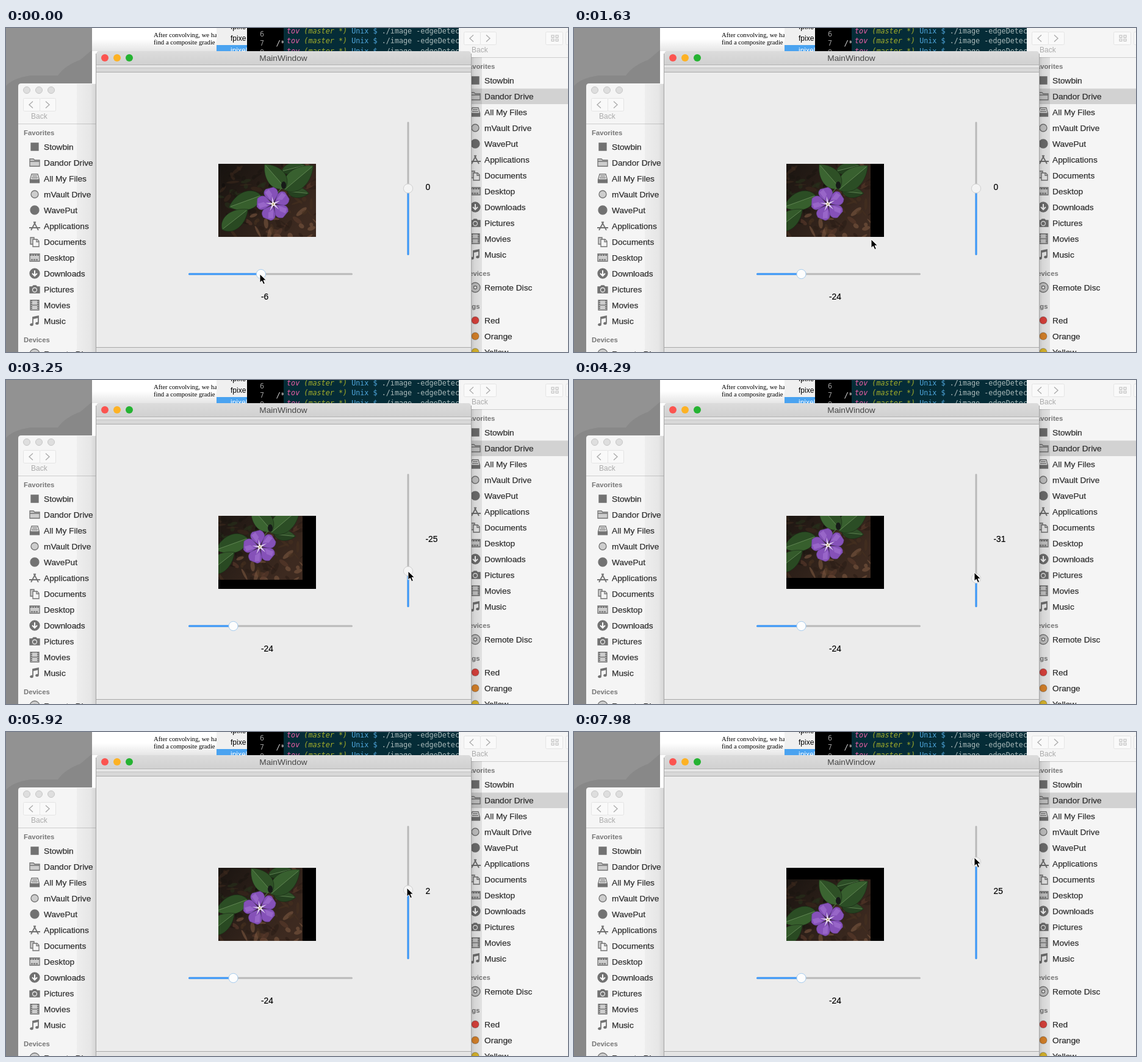
Animation, 921 px wide and 532 px high, one loop 8 s. Source, as an HTML page:

```html
<!DOCTYPE html>
<html lang="en">
<head>
<meta charset="utf-8">
<title>MainWindow</title>
<style>
  html, body { margin: 0; width: 100%; height: 100%; overflow: hidden; background: #8f8f8f; }
  svg { display: block; }
  text { font-family: "Liberation Sans", Arial, sans-serif; font-size: 13.7px; white-space: pre; }
  .row { fill: #303030; stroke: #303030; stroke-width: .25; }
  .head { font-size: 11.3px; font-weight: bold; fill: #777; }
  .back { font-size: 12px; fill: #ababab; }
  .icon { fill: none; stroke: #727272; stroke-width: 1.3; }
  .icon .solid { fill: #727272; }
  .icon .soft { fill: #cdcdcd; }
  .paper { font-family: "Liberation Serif", "Noto Serif", serif; font-size: 10.7px; }
  .list { font-size: 12px; }
  .mono { font-family: "DejaVu Sans Mono", monospace; font-size: 11.75px; }
  .value { font-size: 13.8px; stroke: #000; stroke-width: .2; }
</style>
</head>
<body>
<svg id="stage" width="921" height="532" viewBox="0 0 921 532">
  <defs>
    <linearGradient id="title" x2="0" y2="1"><stop stop-color="#dcdcdc"/><stop offset="1" stop-color="#d0d0d0"/></linearGradient>
    <linearGradient id="shade"><stop stop-opacity=".22"/><stop offset=".3" stop-opacity=".13"/><stop offset="1" stop-opacity=".08"/></linearGradient>
    <linearGradient id="shadeLeft"><stop stop-opacity=".03"/><stop offset=".7" stop-opacity=".06"/><stop offset="1" stop-opacity=".14"/></linearGradient>
    <linearGradient id="shadeTop" x2="0" y2="1"><stop stop-opacity="0"/><stop offset="1" stop-opacity=".1"/></linearGradient>
    <linearGradient id="soil" y2=".6"><stop stop-color="#16120f"/><stop offset="1" stop-color="#3d2a20"/></linearGradient>
    <clipPath id="photoEdge"><rect width="160" height="120"/></clipPath>
  </defs>

  <rect width="921" height="532" fill="#929292"/>
  <path d="M0 95Q12 82 40 78H85Q96 62 122 52L141 36V92H20V532H0z" fill="#888"/>

  <rect x="141" width="204" height="92" fill="#fff"/>
  <text class="paper" x="242" y="15">After convolving, we ha</text>
  <text class="paper" x="242" y="27">find a composite gradie</text>
  <rect x="141" y="18" width="204" height="20" fill="url(#shadeTop)"/>

  <rect x="345" width="50" height="40" fill="#f0f0f0"/>
  <rect x="345" y="28" width="50" height="12" fill="#4aa3f0"/>
  <text class="list" x="368" y="2">fpixe</text>
  <text class="list" x="368" y="21">fpixe</text>
  <text class="list" x="368" y="41" fill="#fff">ipixel</text>
  <rect x="395" width="60" height="40"/>
  <g fill="#9a9a9a"><text class="mono" x="416" y="14">6</text><text class="mono" x="416" y="29">7</text><text class="mono" x="416" y="44">8</text><text class="mono" x="443" y="29" font-style="italic" fill="#ddd">/*</text></g>
  <rect x="455" width="287" height="40" fill="#052c37"/>
  <g id="terminal"></g>

  <g id="finders"></g>

  <rect x="116" y="92" width="32" height="440" fill="url(#shadeLeft)"/>
  <rect x="762" y="48" width="18" height="484" fill="url(#shade)"/>

  <path d="M148 532V43q0-5 5-5H757q5 0 5 5V532z" fill="#ececec"/>
  <path d="M148 61V43q0-5 5-5H757q5 0 5 5V61z" fill="url(#title)"/>
  <path d="M148 60.5H762" stroke="#b4b4b4"/>
  <rect x="148" y="61" width="614" height="4" fill="#e6e6e6"/>
  <rect x="148" y="65" width="614" height="7" fill="#d8d8d8"/>
  <path d="M148 65.5H762" stroke="#c2c2c2"/>
  <path d="M148 72.5H762M148 524.5H762" stroke="#a9a9a9"/>
  <rect x="148" y="525" width="614" height="7" fill="#e4e4e4"/>
  <path d="M147.5 42V532M762.5 42V532" stroke="#a5a5a5"/>
  <circle cx="162" cy="49" r="6" fill="#fb5450"/><circle cx="182" cy="49" r="6" fill="#fdb224"/><circle cx="202" cy="49" r="6" fill="#25b332"/>
  <text class="title" x="454.5" y="54" text-anchor="middle" fill="#454545">MainWindow</text>

  <svg x="348" y="223" width="160" height="120">
    <rect width="160" height="120"/>
    <g id="photo"><g id="scene" clip-path="url(#photoEdge)"></g></g>
  </svg>

  <g stroke-width="3" stroke-linecap="round">
    <path d="M300.5 404H566.5M659 155.5V371.5" stroke="#b9b9b9"/>
    <path id="fillX" stroke="#3b99fc"/><path id="fillY" stroke="#3b99fc"/>
  </g>
  <circle id="knobX" cy="404" r="7.6" fill="#fdfdfd" stroke="#a3cbee"/>
  <circle id="knobY" cx="659" r="7.6" fill="#f4f4f4" stroke="#cfcfcf"/>
  <text id="labelX" class="value" x="418" y="446"></text>
  <text id="labelY" class="value" x="687.5" y="266"></text>
  <path id="cursor" d="M0 0V14.2L3.3 11.2L5.8 16.7L8.4 15.6L6 10.2H10.5Z" stroke="#fff"/>
</svg>

<script>
const $ = id => document.getElementById(id);

// Sidebar windows
const sidebar = [
  ['Stowbin', '<path class="solid" d="M-6-6H6V6H-6z"/>'],
  ['Dandor Drive', '<path class="soft" d="M-8-6h6l2 2h8v10H-8zM-8-2H8"/>'],
  ['All My Files', '<path d="M-5-7H5L7.500 2V7H-7.500V2zM-7.500 2H7.500M-4-4H4M-5-1H5"/><path class="solid" d="M-7 3H7V6H-7z"/>'],
  ['mVault Drive', '<circle class="soft" r="6"/>'],
  ['WavePut', '<circle class="solid" r="7"/>'],
  ['Applications', '<path d="M-9 3H9M-6 7L1.500-7M6 7L-1.500-7" stroke-width="1.8"/>'],
  ['Documents', '<path class="soft" d="M-7-7h6v11h-6z"/><path fill="#f4f4f4" d="M-3-4H4L7-1V8H-3zM3-4V0H7"/>'],
  ['Desktop', '<path class="soft" d="M-8-6H8V6H-8z"/><path d="M-8-4H8M-6 3.500H6" stroke-width="2" stroke-dasharray="3 1"/>'],
  ['Downloads', '<circle class="solid" r="8"/><path d="M0-5V4M-4 0L0 4L4 0" stroke="#fff" stroke-width="2"/>'],
  ['Pictures', '<path class="solid" d="M-8-4h4l2-2h4l2 2h4V6H-8z"/><circle cy="1" r="3.500" stroke="#eee"/>'],
  ['Movies', '<path class="soft" d="M-7-8H7V8H-7z"/><path d="M-5.500-8V8M5.500-8V8" stroke-width="3" stroke-dasharray="2 1"/><path d="M-4 0H4"/>'],
  ['Music', '<path d="M-3 5V-6L6-8V3M-3-4L6-6" stroke-width="1.8"/><ellipse class="solid" cx="-5" cy="6" rx="2.200" ry="1.500"/><ellipse class="solid" cx="4" cy="4" rx="2.200" ry="1.500"/>']
];
const disc = '<circle class="soft" r="8"/><circle r="2.500" fill="#fff"/>';
const row = (y, name, icon) =>
  `<g class="icon" transform="translate(47 ${y})">${icon}</g><text class="row" x="62" y="${y + 5}">${name}</text>`;
const head = (y, name) => `<text class="head" x="29" y="${y + 4}">${name}</text>`;
const tag = (y, name, color) => row(y, name, `<circle r="6" fill="${color}" stroke="#0003"/>`);

function finder(dx, dy, selected) {
  const dots = [34, 54, 74].map(x => `<circle cx="${x}" cy="102" r="5.500" fill="#dedede" stroke="#c6c6c6"/>`).join('');
  const buttons = [[28, 27], [55, 26], [162, 28], [195, 28]]
    .map(([x, w]) => `<rect x="${x + .5}" y="115.500" width="${w}" height="21" rx="2" fill="#f9f9f9" stroke="#e4e4e4"/>`).join('');
  const grid = [[172, 121], [179, 121], [172, 127], [179, 127]]
    .map(([x, y]) => `<rect x="${x}" y="${y}" width="4" height="3.500" fill="none" stroke="#b9b9b9"/>`).join('');
  return `<g transform="translate(${dx} ${dy})">
    <path d="M20 700V96q0-5 5-5H320V700z" fill="#f5f5f5"/>
    <path d="M20 157.500H320" stroke="#cdcdcd"/>
    ${selected ? '<path d="M20 208.500H320V234H20z" fill="#d2d2d2"/>' : ''}
    ${dots}${buttons}${grid}
    <path d="M44 120.500L38 126L44 131.500M65 120.500L71 126L65 131.500" fill="none" stroke="#adadad" stroke-width="1.400"/>
    <text class="back" x="41" y="149">Back</text>
    ${head(172, 'Favorites')}${sidebar.map(([n, i], k) => row(195 + 26 * k, n, i)).join('')}
    ${head(512, 'Devices')}${row(535, 'Remote Disc', disc)}
    ${head(566, 'Tags')}${tag(589, 'Red', '#e8453f')}${tag(615, 'Orange', '#e58a2c')}${tag(641, 'Yellow', '#e9c22e')}
  </g>`;
}
$('finders').innerHTML = finder(0, 0, false) + finder(722, -109, true);

$('terminal').innerHTML = [9, 25, 42].map(y => `<text class="mono" x="460" y="${y}"><tspan fill="#ee5fa7" font-style="italic">tov</tspan><tspan fill="#a3ad2a" font-style="italic"> (master *)</tspan><tspan fill="#4fa6dc"> Unix $</tspan><tspan fill="#a9b9b9"> ./image -edgeDetec</tspan></text>`).join('');

// Flower picture
let seed = 11;
const rand = () => (seed = seed * 16807 % 2147483647) / 2147483647;
const blot = () => {
  const x = rand() * 160, y = rand() * 120;
  const warm = ['#5a3b2b', '#7a5740', '#46301f', '#2a1c15'], dark = ['#0f0d0b', '#26301a', '#3a281c', '#1a1511'];
  const color = (x + y > 140 ? warm : dark)[Math.floor(rand() * 4)];
  return `<ellipse transform="translate(${x} ${y}) rotate(${rand() * 180})" rx="${3 + rand() * 8}" ry="${1 + rand() * 3.5}" fill="${color}" opacity=".6"/>`;
};
const leaf = (x, y, len, w, angle, color) =>
  `<g transform="translate(${x} ${y}) rotate(${angle})"><path d="M0 0C${len * .15} ${-w} ${len * .65} ${-w} ${len} 0C${len * .65} ${w} ${len * .15} ${w} 0 0z" fill="${color}" stroke="#1b2c17" stroke-width=".6"/><path d="M0 0C${len * .15} ${w} ${len * .65} ${w} ${len} 0z" fill="#0c1f0c" opacity=".28"/><path d="M2 0H${len - 3}" stroke="#6f9460" stroke-width=".7"/></g>`;
const petal = angle =>
  `<g transform="rotate(${angle})"><path d="M2 0L13-10Q21-15 26-8L27 5Q22 13 14 10z" fill="#8551b8" stroke="#64409a" stroke-width=".5"/><path d="M8-4L21-10L25-3L16 1z" fill="#9f6fce" opacity=".7"/><path d="M1-1.500L13 0L1 1.500z" fill="#e6daf2"/></g>`;
$('scene').innerHTML = '<rect width="160" height="120" fill="url(#soil)"/>'
  + Array.from({ length: 130 }, blot).join('')
  + leaf(113, 45, 36, 12, 6, '#2f4f28') + leaf(104, 12, 40, 12, -14, '#2c4d26')
  + leaf(108, 43, 62, 22, -40, '#38602f') + leaf(110, 40, 52, 20, -131, '#3b6431')
  + leaf(70, 52, 56, 20, 160, '#375f2d') + leaf(6, 108, 54, 19, -38, '#345a2b')
  + '<path d="M92 58Q98 44 106 38" fill="none" stroke="#4c6a3b" stroke-width="1.500"/><ellipse cx="107" cy="35" rx="4" ry="6" fill="#171a18"/>'
  + `<g transform="translate(90 66)">${[-100, -28, 44, 116, 188].map(petal).join('')}<circle r="2.800" fill="#f0ead8"/><circle r="1" fill="#94803c"/></g>`;

const STEP = 147.85, LOOP = 8000;
const tracks = {
  x: [[2, -6], [6, -14], [7, -14], [10, -24]],
  y: [[13, 0], [15, -6], [23, -28], [26, -33], [29, -31], [31, -25], [34, -12], [35, -12], [43, 10], [44, 12], [51, 22], [54, 25]],
  panX: [[2, 0], [6, -8], [7, -8], [10, -22]],
  panY: [[13, 0], [15, -4], [23, -17], [26, -20], [29, -18], [34, -10], [35, -10], [44, 8], [51, 19]],
  cursorX: [[0, 416], [1, 407], [2, 407], [6, 385], [7, 385], [9, 371], [10, 400], [13, 660], [15, 660], [23, 659], [29, 656], [34, 658], [44, 657], [54, 656]],
  cursorY: [[0, 404], [6, 406], [9, 405], [10, 388], [13, 265], [15, 275], [23, 320], [26, 329], [29, 316], [31, 306], [34, 278], [35, 278], [44, 238], [51, 212], [54, 206]]
};
function at(keys, step) {
  const next = keys.findIndex(k => k[0] > step);
  if (next === 0) return keys[0][1];
  if (next < 0) return keys[keys.length - 1][1];
  const [s0, v0] = keys[next - 1], [s1, v1] = keys[next];
  return Math.round(v0 + (v1 - v0) * (step - s0) / (s1 - s0));
}
const set = (id, name, value) => $(id).setAttribute(name, value);

function draw(time) {
  const step = Math.floor((time % LOOP + 6) / STEP);
  const now = name => at(tracks[name], step);
  const x = now('x'), y = now('y');
  const knobX = 433 + 2.52 * x, knobY = 263.5 - 2.01 * y;
  set('fillX', 'd', `M300.5 404H${knobX}`);
  set('fillY', 'd', `M659 371.5V${knobY}`);
  set('knobX', 'cx', knobX);
  set('knobY', 'cy', knobY);
  $('labelX').textContent = x;
  $('labelY').textContent = y;
  set('photo', 'transform', `translate(${now('panX')} ${now('panY')})`);
  set('cursor', 'transform', `translate(${now('cursorX')} ${now('cursorY')})`);
}

const start = performance.now();
function tick() {
  draw(performance.now() - start);
  requestAnimationFrame(tick);
}
tick();
</script>
</body>
</html>
```
